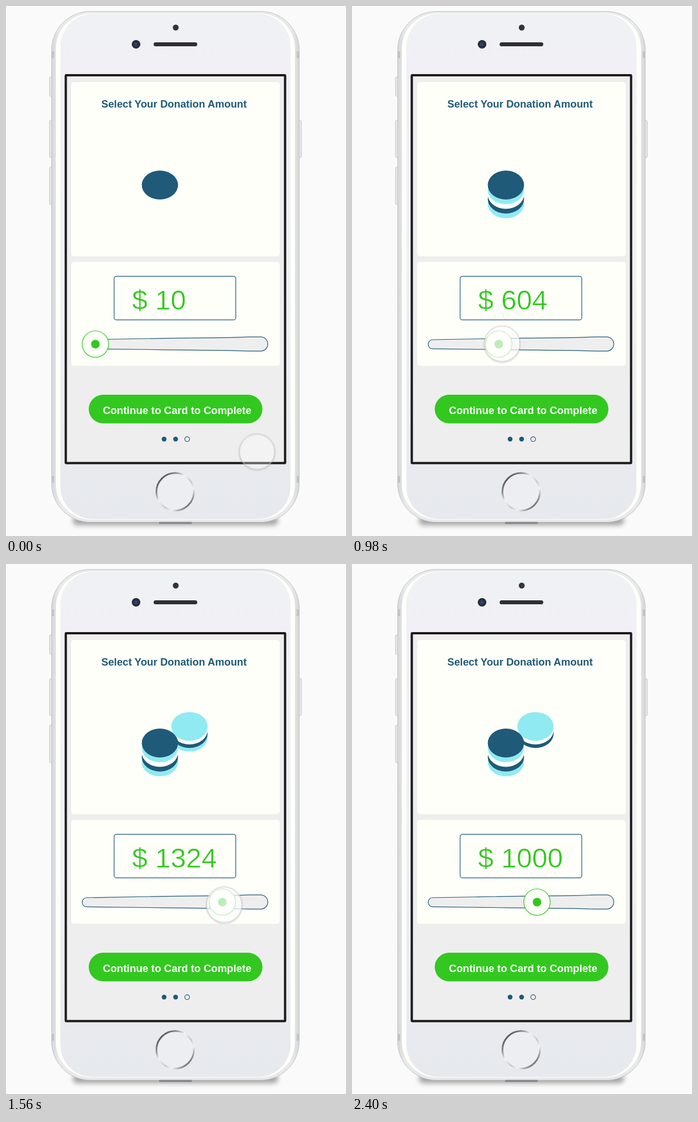
An HTML page that plays this animation: 600 by 934 pixels, repeating every 4.4 s.

```html
<!DOCTYPE html>
<html lang="en">
<head>
<meta charset="utf-8">
<title>Donation slider</title>
<style>
  html, body { margin: 0; width: 100%; height: 100%; overflow: hidden; background: #fafafa; }
  svg { display: block; width: 100vw; height: 100vh; }
  text { font-family: "Liberation Sans", Arial, sans-serif; }
  .bold { font-size: 18.3px; font-weight: 700; text-anchor: middle; }
  .amount { font-size: 49px; fill: #32c81f; stroke: #fffff9; stroke-width: .6px; }
  .card { fill: #fffff9; }
  .line { stroke: #1f5a78; stroke-width: 1.2; }
  .navy { fill: #1f5a78; }
  .side { fill: #ececee; stroke: #bcbcbf; stroke-width: 1; }
  .band { fill: #c3c4c7; }
</style>
</head>
<body>
<svg viewBox="0 0 600 934">
  <defs>
    <linearGradient id="face" x2="0" y2="1">
      <stop offset="0" stop-color="#eef2f4"/>
      <stop offset=".11" stop-color="#f1eff5"/>
      <stop offset=".5" stop-color="#eff1f3"/>
      <stop offset="1" stop-color="#e6e9ed"/>
    </linearGradient>
    <linearGradient id="rim">
      <stop offset="0" stop-color="#d6d7d9"/>
      <stop offset=".03" stop-color="#e8e9eb"/>
      <stop offset=".97" stop-color="#e8e9eb"/>
      <stop offset="1" stop-color="#d6d7d9"/>
    </linearGradient>
    <linearGradient id="home" x1=".1" y1=".1" x2=".9" y2=".9">
      <stop offset="0" stop-color="#4c4c4e"/>
      <stop offset=".2" stop-color="#8a8a8c"/>
      <stop offset=".38" stop-color="#f4f4f4"/>
      <stop offset=".6" stop-color="#c9c9cb"/>
      <stop offset=".75" stop-color="#f4f4f4"/>
      <stop offset="1" stop-color="#58585a"/>
    </linearGradient>
    <filter id="blur" x="-20%" y="-200%" width="140%" height="500%"><feGaussianBlur stdDeviation="4"/></filter>
    <filter id="soft"><feGaussianBlur stdDeviation="1"/></filter>
  </defs>
  <rect width="600" height="934" fill="#fafafa"/>

  <!-- phone -->
  <rect x="118" y="898" width="362" height="17" rx="8" fill="#777" opacity=".65" filter="url(#blur)"/>
  <rect class="side" x="77" y="125" width="6" height="34" rx="2"/>
  <rect class="side" x="77" y="202" width="6" height="65" rx="2"/>
  <rect class="side" x="77" y="284" width="6" height="66" rx="2"/>
  <rect class="side" x="515" y="202" width="6" height="65" rx="2"/>
  <rect x="80.5" y="9.5" width="437" height="900" rx="68" fill="url(#rim)" stroke="#c2c3c5"/>
  <rect class="band" x="80" y="80" width="5" height="12"/>
  <rect class="band" x="513" y="80" width="5" height="12"/>
  <rect class="band" x="80" y="828" width="5" height="12"/>
  <rect class="band" x="513" y="828" width="5" height="12"/>
  <rect x="88" y="13" width="422" height="892" rx="62" fill="#fffffa"/>
  <rect x="96" y="14" width="406" height="890" rx="57" fill="url(#face)"/>
  <rect x="270" y="909" width="58" height="4" rx="1.5" fill="#8d8d90"/>
  <circle cx="299.5" cy="38" r="5.2" fill="#343437"/>
  <circle cx="229.5" cy="67.5" r="7.6" fill="#2a2d35"/>
  <circle cx="229" cy="67.5" r="3.4" fill="#27417e"/>
  <rect x="260.5" y="64" width="77" height="7" rx="3.5" fill="#2f2f32"/>
  <circle cx="298.5" cy="856" r="33" fill="#eceef1" stroke="url(#home)" stroke-width="3"/>

  <!-- screen -->
  <rect x="105.5" y="122" width="387" height="683.5" rx="1" fill="#eee" stroke="#1b1b1b" stroke-width="4"/>
  <rect class="card" x="115" y="134" width="368" height="307" rx="5"/>
  <rect class="card" x="115" y="451" width="368" height="183" rx="5"/>
  <text class="bold navy" x="296.5" y="179.3">Select Your Donation Amount</text>
  <g id="back"></g>
  <g id="front"></g>
  <rect class="line" x="190.8" y="476.3" width="214.7" height="76.9" rx="4" fill="none"/>
  <text class="amount" id="amount" x="222.5" y="535">$ 10</text>
  <path class="line" fill="#eee" d="M142.5 588 L280 585.6 L392 584.4 L430 583.2 H449.5 a12.5 12.5 0 0 1 0 25 H430 L392 607.2 L280 605.8 L142.5 604.2 a8.1 8.1 0 0 1 0 -16.2 Z"/>
  <g id="knob">
    <circle r="23.3" fill="#fffff9" stroke="#32c81f" stroke-width="1.2"/>
    <circle r="7.6" fill="#32c81f"/>
  </g>
  <rect x="146" y="685" width="306.5" height="50.5" rx="25.25" fill="#32c81f"/>
  <text class="bold" x="302" y="718.8" fill="#fff" style="font-size:18.5px">Continue to Card to Complete</text>
  <circle class="navy" cx="279" cy="763.3" r="4.2"/>
  <circle class="navy" cx="299.3" cy="763.3" r="4.2"/>
  <circle class="line" cx="319.7" cy="763.3" r="4.2" fill="none"/>

  <g id="touch">
    <circle r="31.5" cy="1.3" fill="none" stroke="#999" stroke-width="1.6" opacity=".55" filter="url(#soft)"/>
    <circle id="pad" r="31" fill="#fff"/>
    <circle r="31.2" fill="none" stroke="#d2d2d2" stroke-width="1"/>
  </g>
</svg>
<script>
const LOOP = 4400;
const $ = id => document.getElementById(id);
const NAVY = '#1f5a78', CYAN = '#90eaf2', WHITE = '#fff';

// Each coin shows once the amount reaches its limit; the first is on top.
function stack(id, x, y, step, coins) {
  return coins.map(([limit, color], i) => {
    const el = document.createElementNS('http://www.w3.org/2000/svg', 'ellipse');
    const set = { cx: x, cy: y + i * step, rx: 32, ry: 25.4, fill: color };
    for (const k in set) el.setAttribute(k, set[k]);
    $(id).prepend(el);
    return { el, limit };
  });
}
const coins = [
  ...stack('front', 271.6, 315.5, 8.3, [[0, NAVY], [150, CYAN], [300, WHITE], [450, NAVY], [600, CYAN]]),
  ...stack('back', 323.8, 286.3, 6.3, [[700, CYAN], [850, WHITE], [1000, NAVY], [1150, CYAN]])
];

// Keys are [time, value, slope]; a missing slope counts as zero.
function curve(keys, t) {
  if (t <= keys[0][0]) return keys[0][1];
  for (let i = 1; i < keys.length; i++) {
    const [t0, a, m = 0] = keys[i - 1], [t1, b, n = 0] = keys[i];
    if (t > t1) continue;
    const d = t1 - t0, u = (t - t0) / d, e = u * u * (3 - 2 * u);
    return a + (b - a) * e + d * u * (1 - u) * (m * (1 - u) - n * u);
  }
  return keys[keys.length - 1][1];
}

const amountKeys = [[590, 10, .6], [980, 604, 1.45], [1380, 1096, 1.2], [1620, 1350],
  [1720, 1324, -.75], [1960, 1054, -.6], [2200, 1000]];
const gapKeys = [[600, 3.3], [980, 6], [1380, 5.5], [1720, 1.5], [1960, 3.5]];
const heightKeys = [[0, 785], [400, 594], [980, 595], [1380, 594], [1720, 608, .03], [1960, 612]];
const padKeys = [[0, .3], [400, .5], [500, .68]];
const fadeKeys = [[2280, 1], [2400, 0]];

const place = (el, x, y) => el.setAttribute('transform', `translate(${x.toFixed(2)} ${y.toFixed(2)})`);

function draw(t) {
  const amount = Math.round(curve(amountKeys, t));
  const x = 156 + amount * .1705;
  $('amount').textContent = '$ ' + amount;
  for (const c of coins) c.el.style.display = amount >= c.limit ? '' : 'none';
  place($('knob'), x, 595.8);
  const reach = curve([[0, 443], [400, 161]], t);
  place($('touch'), t < 400 ? reach : x + curve(gapKeys, t), curve(heightKeys, t));
  $('pad').style.fillOpacity = curve(padKeys, t);
  $('touch').style.opacity = curve(fadeKeys, t);
}

let start;
function tick(now) {
  start ??= now;
  draw(Math.max(0, now - start) % LOOP);
  requestAnimationFrame(tick);
}
draw(0);
requestAnimationFrame(tick);
</script>
</body>
</html>
```
